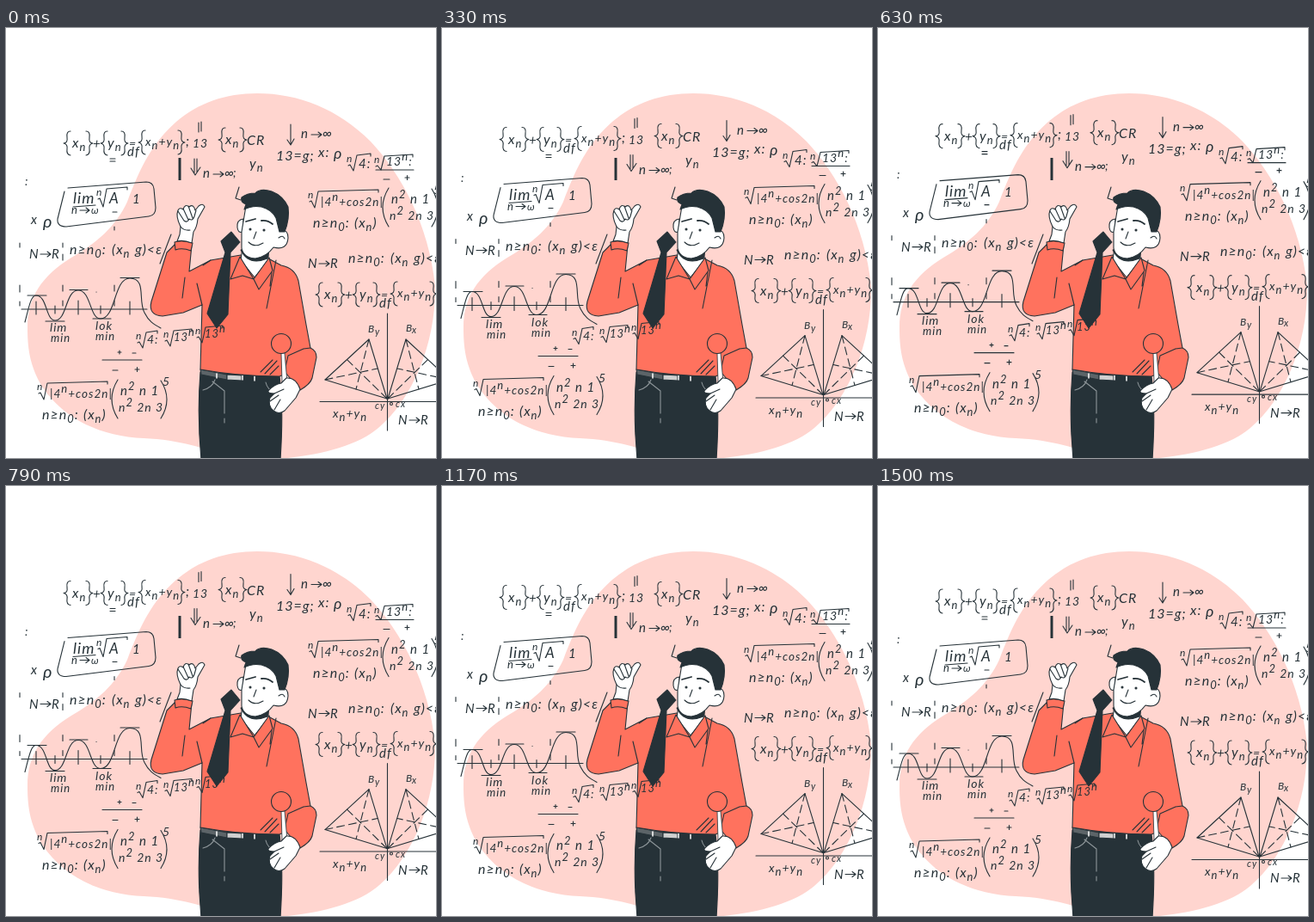
Write an HTML page that moves like this. It is 500x500 px and loops after 1.54 s.

```html
<!DOCTYPE html>
<html lang="en">
<head>
<meta charset="utf-8">
<title>Floating formulas</title>
<style>
  html, body { margin: 0; width: 100%; height: 100%; overflow: hidden; background: #fff; }
  svg { display: block; width: 500px; height: 500px; }
  text { font: italic 16px Lato, "Noto Sans", sans-serif; letter-spacing: 1px; fill: #263238; stroke: none; }
  .ink { fill: none; stroke: #263238; stroke-width: 1.1; stroke-linecap: round; stroke-linejoin: round; }
  .red { fill: #ff725e; }
  .skin { fill: #fff; }
  .dark { fill: #263238; }
</style>
</head>
<body>
<svg viewBox="0 0 500 500">
  <path fill="#ffd5cf" d="M292 76C340 76 386 94 424 132C460 170 492 230 499 300C500 365 474 430 433 465C405 489 350 500 300 502H264C236 490 205 479 160 477C112 475 68 456 42 417C27 392 25 370 25 348C25 313 42 288 76 267C106 250 128 230 141 202C157 160 170 134 198 109C224 87 255 76 292 76Z"/>

  <g class="ink">
    <path stroke-width="3" stroke-linecap="butt" d="M202 151V177"/>
    <path d="M271 185L267 198L273 200M192 240L179 274"/>

    <!-- trousers and belt -->
    <path class="dark" d="M226 400L318 405Q323 440 319 502H227Q222 450 226 400Z"/>
    <path stroke="#8d9599" d="M243 409Q240 418 229 421M240 411L254 422V448M254 454V459M302 412Q304 421 313 424"/>
    <path fill="#5c6468" d="M226 397L257 403V409L227 403Z"/>
    <path fill="#d0d0d0" d="M257 403L274 404V410L257 409Z"/>
    <path stroke="#fff" stroke-width="1.5" d="M245 402V407M275 404V409M289 405V410"/>

    <!-- shirt -->
    <path class="red" d="M197 251L187 261L169 318Q165 334 182 335L206 331L228 322L226 397Q270 405 318 405L326 402L342 421Q354 414 356 407L361 383Q361 375 354 372L349 345L340 294Q336 279 320 276L305 268L273 264L238 270L213 283L216 252Z"/>
    <path d="M238 270L229 276M228 322L222 297M208 290L205 314M314 270L303 326M309 284L307 300M328 381L323 403M328 381L346 373L354 372M296 400L310 386M301 402L315 387M307 403L317 393"/>
    <path class="red" d="M196 249Q206 246 217 250L215 259Q205 255 197 258Z"/>

    <!-- neck, collar and head -->
    <path class="skin" d="M275 255L273 270L289 290L305 270V253Z"/>
    <path class="dark" d="M273 258Q282 277 304 268L307 254Z"/>
    <path class="red" d="M272 266L261 292L275 288L288 292ZM306 267L288 292L294 304L310 282Z"/>
    <path class="skin" d="M276 222Q268 223 269 232Q270 239 275 237Z"/>
    <path class="skin" d="M279 207L274 237L274 256Q276 267 290 268Q303 266 311 255Q327 259 328 244Q328 235 321 235V218L305 205Z"/>
    <path class="dark" d="M277 211Q286 206 297 208Q309 211 314 221L318 237L324 237Q330 222 328 208Q322 195 309 190Q296 186 290 192Q280 192 274 197Q272 202 279 205Z"/>
    <path stroke-width="1.8" d="M279 225L290 222M297 224Q304 223 310 228"/>
    <circle class="dark" cx="284" cy="234" r="1"/>
    <circle class="dark" cx="300" cy="235" r="1"/>
    <path d="M291 237L288 245M282 249Q289 256 299 250M317 244Q322 240 324 245"/>

    <!-- tie -->
    <path class="dark" d="M250 248L262 237L272 249L261 261L258 333L245 349L234 332L255 261Z"/>

    <!-- raised hand -->
    <path class="skin" d="M203 231Q197 219 200 212Q202 208 206 211Q208 204 213 208Q218 204 220 212L224 207Q229 203 231 208L223 222Q222 232 218 237L216 250Q206 246 199 248L202 240Z"/>
    <path d="M200 213L207 224M206 210L212 223M212 207L217 221M207 224Q211 227 213 222M213 222Q217 225 219 219L221 212M203 231Q207 236 214 235"/>

    <!-- paddle and lower hand -->
    <path class="skin" stroke-width=".8" d="M320 378L321 412H327L324 378Z"/>
    <circle class="red" cx="320" cy="367" r="11.5"/>
    <path class="skin" d="M326 407Q337 406 342 420L337 430L324 445Q317 450 311 445Q304 439 307 430L312 425Q304 425 305 422Q312 414 320 413Z"/>
    <path d="M312 425L323 420M312 444L319 432M307 434L317 427"/>
  </g>

  <g id="formulas" class="ink"></g>
</svg>
<script>
const path = (d, attrs = '') => `<path d="${d}" ${attrs}/>`;

// "_n" is a subscript, "^n" a superscript.
const text = (x, y, s, size = 16) => {
  const body = s.replace('<', '&lt;').replace(/([_^])(.)/g, (m, kind, c) =>
    `<tspan style="font-size:13px;baseline-shift:${kind === '_' ? -4 : 6}px">${c}</tspan>`);
  return `<text x="${x}" y="${y}" style="font-size:${size}px">${body}</text>`;
};
const brace = (x, y, flip = 1) =>
  path('M8 0Q3 0 4 7T0 14Q5 15 4 21T8 28', `transform="translate(${x} ${y}) scale(${flip} 1)"`);
const paren = (x, y, h, w) => path(`M${x} ${y}q${-w} ${h / 2} 0 ${h}`);
const arrow = (x, y, w = 12) => path(`M${x} ${y}h${w}m-4-3l4 3-4 3`);
const root = (x, y, w, h = 18) => text(x - 2, y + 8, 'n', 12) +
  path(`M${x} ${y + 12}l2-1 4 ${h - 11} 4${-h}l${w}-2v3`);
const at = (x, y, s) => `<g transform="translate(${x} ${y})">${s}</g>`;

const sets = brace(67, 120) + text(77, 139, 'x_n') + brace(101, 120, -1) +
  text(101, 140, '+', 15) + brace(110, 120) + text(118, 139, 'y_n') + brace(142, 120, -1) +
  text(143, 139, '=', 14) + text(141, 149, 'df', 15) +
  brace(154, 119) + text(162, 137, 'x_n+y_n', 14) + brace(208, 119, -1);

const matrix = root(38, 413, 70, 19) + text(51, 430, '|4^n+cos2n|', 13.5) +
  text(42, 455, 'n≥n_0:') + text(90, 455, '(x_n)') +
  paren(130, 409, 45, 14) + paren(180, 410, 44, -14) +
  text(133, 427, 'n^2 n 1', 15) + text(131, 446, 'n^2 2n 3', 14) + text(182, 416, '5', 14);

const limit = text(74, 263, 'n≥n_0:') + text(123, 263, '(x_n') + text(150, 263, 'g)<ε');

const mapping = text(0, 0, 'N', 15) + arrow(13, -5) + text(26, 0, 'R', 15);
const toInfinity = text(0, 0, 'n', 15) + arrow(12, -4) + text(25, 0, '∞', 16);

const topRow = text(209, 137, ';') + text(217, 139, '13', 14) +
  path('M224 110V121M227 109V120M121 152h6M121 155h6') +
  path('M219 152V168M222 152V168M215 163L220 171L226 162') +
  at(229, 174, toInfinity) + text(264, 173, ';', 14) +
  brace(247, 116) + text(255, 135, 'x_n') + brace(280, 116, -1) + text(280, 136, 'CR', 16) +
  path('M331 112V136M327 130L331 136L335 129') + at(343, 128, toInfinity) +
  text(314, 154, '13=g;', 16) + text(363, 150, 'x:', 16) + text(381, 152, 'ρ', 18) +
  text(283, 163, 'y_n') + root(398, 148, 16) + text(410, 163, '4:', 15) +
  root(430, 149, 33, 16) + text(442, 160, '13^n:', 14) +
  path('M430 165H474M439 176h7M464 174h5M466.500 171.500v5');

const box = path('M72 186L163 179Q171 179 172 187L174 209Q174 218 166 219L70 231Q59 231 60 222L68 190') +
  text(78, 204, 'lim', 18) + path('M78 208L104 206') + text(76, 216, 'n', 13) +
  arrow(86, 212, 11) + text(99, 216, 'ω', 12) + root(107, 187, 24, 21) +
  text(120, 204, 'A', 17) + text(147, 204, '1', 15) + path('M124 214h5M126 231v4') +
  text(22, 183, ':', 14) + text(29, 228, 'x', 15) + text(43, 232, 'ρ', 20);

const graph = path('M18 327H164M35 318V333M57 323V332M84 317V333M110 323V332M144 318V333') +
  path('M22 342C27 323 29 311 35 311C48 311 46 340 57 340C71 340 69 305 84 305C99 305 97 338 110 338C128 338 125 291 144 291C164 291 153 317 161 331C166 341 171 344 180 349') +
  path('M25 311H47M74 304.500H95M133 290.500H155M46 341H68M101 338H122') +
  path('M16 250v5M16 299v8M16 318v5M66 250v5M66 263v7M66 299v7M66 317v6M126 299v7M126 317v6M105 307h.1') +
  text(51, 353, 'lim', 14) + text(52, 365, 'min', 13) +
  text(104, 351, 'lok', 14) + text(104, 363, 'min', 13) +
  root(153, 354, 13) + text(164, 367, '4:', 14) +
  root(185, 352, 21) + text(195, 364, '13^n', 13) +
  root(222, 348, 20) + text(231, 360, '13^n', 13) +
  path('M112 386H158M130 377h4M132 375v4M147 378h4M124 398h6M150 397h5M152.500 394.500v5');

const triangle = path('M443 431L371 409L422 362Z') +
  path('M371 409L432 396M422 362L407 420M443 431L396 385', 'stroke-dasharray="9 5"');
const diagram = path('M443.500 332V468M365 434.500H500') + triangle +
  `<g transform="translate(887 0) scale(-1 1)">${triangle}</g>` +
  text(421, 354, 'B', 12) + text(429, 357, 'y', 11) + text(465, 353, 'B', 12) + text(472, 355, 'x', 11) +
  text(429, 443, 'cy', 11) + text(453, 441, 'cx', 11) + '<circle cx="448" cy="437" r="1.500"/>' +
  text(380, 453, 'x_n+y_n', 14);

const formulas = document.getElementById('formulas');
formulas.innerHTML = sets + at(293, 176, sets) + matrix + at(315, -223, matrix) +
  limit + at(324, 10, limit) + at(27, 268, mapping) + at(351, 279, mapping) +
  at(456, 461, mapping) + topRow + box + graph + diagram;

// Linear float up 10px and back in 36 steps, then a one-step rest.
const LOOP = 1540, STEPS = 37;
function draw(now) {
  const step = Math.min(36, Math.floor((now % LOOP + 4) * STEPS / LOOP));
  const lift = 10 * (1 - Math.abs(1 - step / 18));
  formulas.setAttribute('transform', `translate(0 ${-lift})`);
  requestAnimationFrame(draw);
}
draw(performance.now());
</script>
</body>
</html>
```
